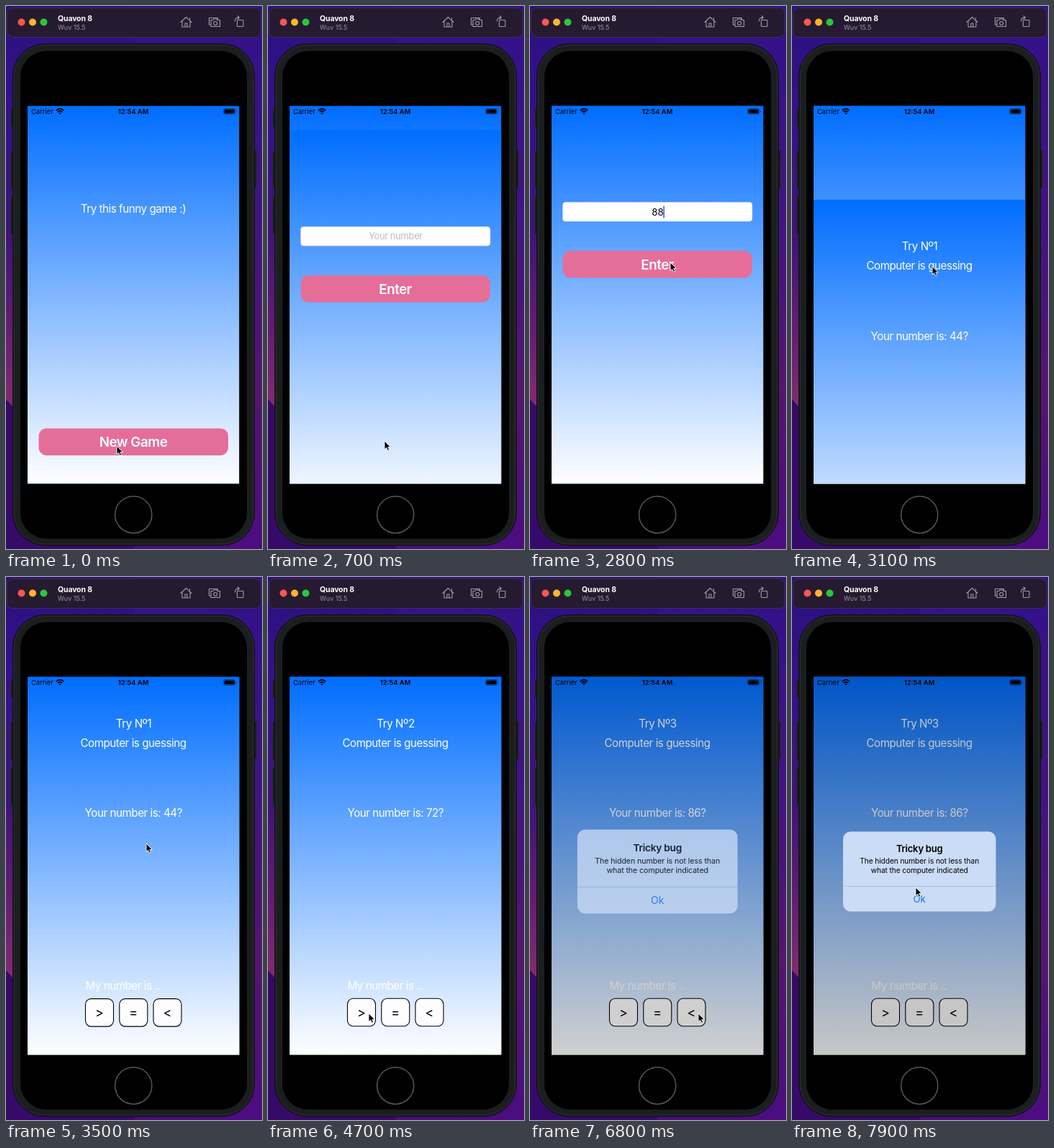
An HTML page that plays this animation: 356x754 px, repeating every 8000 ms.

```html
<!DOCTYPE html>
<html lang="en">
<head>
<meta charset="utf-8">
<title>Guessing game</title>
<style>
  html, body { margin: 0; width: 100%; height: 100%; overflow: hidden; background: #2c0f70; }
  svg { display: block; width: 100vw; height: 100vh; }
  text { font-family: Inter, Roboto, sans-serif; fill: #fff; }
  .mid { text-anchor: middle; }
  .body { font-size: 15.2px; letter-spacing: -.031em; }
  .big { font-size: 18.8px; font-weight: 600; letter-spacing: -.025em; }
  .input { font-size: 13px; letter-spacing: -.03em; }
  .sign { font-size: 18px; fill: #000; }
  .status text { font-size: 9.4px; fill: #000; }
  .small { font-size: 10.2px; letter-spacing: -.01em; }
  .dark { fill: #000; }
  .pink { fill: #e56e99; }
  .key { fill: #fdfdff; stroke: #000; stroke-width: 1.1; }
  .icon { fill: none; stroke: #a39aaa; stroke-width: 1.1; stroke-linejoin: round; stroke-linecap: round; }
</style>
</head>
<body>
<svg viewBox="0 0 356 754">
  <defs>
    <linearGradient id="sky" x1="0" y1="0" x2="0" y2="1">
      <stop offset="0" stop-color="#006dff"/><stop offset="1" stop-color="#fff"/>
    </linearGradient>
    <linearGradient id="wall" x1="0" y1="0" x2="0" y2="1">
      <stop offset="0" stop-color="#2b1080"/><stop offset=".2" stop-color="#34128a"/>
      <stop offset=".42" stop-color="#3f1478"/><stop offset=".6" stop-color="#651d74"/>
      <stop offset=".73" stop-color="#822a70"/><stop offset="1" stop-color="#4a0d78"/>
    </linearGradient>
    <linearGradient id="wallRight" x1="0" y1="0" x2="0" y2="1">
      <stop offset="0" stop-color="#31118a"/><stop offset=".45" stop-color="#44147f"/>
      <stop offset=".7" stop-color="#54166f"/><stop offset="1" stop-color="#4b0d80"/>
    </linearGradient>
    <clipPath id="glass"><rect x="30" y="138.5" width="294.5" height="525"/></clipPath>
  </defs>

  <!-- desktop -->
  <rect width="356" height="754" fill="url(#wall)"/>
  <rect x="178" width="178" height="754" fill="url(#wallRight)"/>
  <path d="M0 546L18 566V700H178V754H0Z" fill="#360a68"/>

  <!-- title bar -->
  <rect x="1.5" y="2.5" width="353" height="41" rx="8" fill="#261a30" stroke="#43364e" stroke-width=".8"/>
  <circle cx="21.5" cy="22.5" r="5" fill="#ff5650"/>
  <circle cx="37" cy="22.5" r="5" fill="#fcb52d"/>
  <circle cx="52.5" cy="22.5" r="5" fill="#2ac73d"/>
  <text x="72" y="21" font-size="10.5" font-weight="700" letter-spacing="-.15">Quavon 8</text>
  <text x="72" y="32.5" font-size="9" style="fill:#9c92a3">Wuv 15.5</text>
  <g class="icon">
    <path d="M243 22.5L250.500 15.500L258 22.500M245 21V29H256V21M255.500 19.500V16.500M249 29V24H252V29"/>
    <path d="M284.500 26H282.500V16.500H294.500V18.500"/>
    <path d="M285 19.500H288L289 18H293L294 19.500H297.500V28.500H285Z"/>
    <circle cx="291.200" cy="24" r="2.500"/>
    <rect x="321.500" y="19.500" width="8.500" height="9" rx="1"/>
    <path d="M318.500 21Q318.500 16 324 16M322 13.800L324.500 16L322 18.200"/>
  </g>

  <!-- phone -->
  <g fill="#191b1c" stroke="#303235" stroke-width=".6">
    <rect x="6.500" y="143" width="5" height="25" rx="1.500"/>
    <rect x="6.500" y="201" width="5" height="53" rx="1.500"/>
    <rect x="6.500" y="264" width="5" height="53" rx="1.500"/>
    <rect x="343.500" y="200" width="5" height="53" rx="1.500"/>
  </g>
  <rect x="9.500" y="52.500" width="336" height="696.500" rx="45" fill="#1b1e1e" stroke="#0d0f10"/>
  <rect x="11.500" y="54.500" width="332" height="692.500" rx="43" fill="none" stroke="#2a2d2d"/>
  <rect x="20" y="62.500" width="315" height="677" rx="36" fill="#000"/>
  <circle cx="177.200" cy="706.300" r="25.600" fill="#000" stroke="#565656" stroke-width="1.500"/>

  <g clip-path="url(#glass)">
    <g>
      <rect x="30" y="138.500" width="294.500" height="525" fill="url(#sky)"/>
      <text class="mid body" x="177" y="287.300">Try this funny game :)</text>
      <rect class="pink" x="45.500" y="586.500" width="263.500" height="37.500" rx="11"/>
      <text class="mid big" x="177" y="612">New Game</text>
    </g>

    <g id="entry">
      <rect x="30" y="138.500" width="294.500" height="525" fill="url(#sky)"/>
      <rect x="45.500" y="272.500" width="263.500" height="26.500" rx="4" fill="#fff" stroke="#d5d9e0" stroke-width=".6"/>
      <text class="mid input" id="hint" x="177.500" y="290.300" style="fill:#bdbdc1">Your number</text>
      <text class="mid" id="typed" x="177.500" y="290.500" font-size="13.400" style="fill:#000"></text>
      <rect id="caret" y="277.500" width="1.600" height="17" fill="#3d5cf0"/>
      <rect class="pink" x="45.500" y="340" width="263.500" height="37.500" rx="11"/>
      <text class="mid big" x="177" y="366">Enter</text>
    </g>

    <g id="guess">
      <rect x="30" y="138.500" width="294.500" height="525" fill="url(#sky)"/>
      <text class="mid body" id="round" x="177.500" y="208.500"></text>
      <text class="mid body" x="177" y="235.500">Computer is guessing</text>
      <text class="mid body" id="ask" x="177.300" y="333"></text>
      <text class="body" x="110.500" y="573">My number is ..</text>
      <rect class="key" x="110.500" y="585.300" width="39" height="38.500" rx="8"/>
      <rect class="key" x="157.800" y="585.300" width="39" height="38.500" rx="8"/>
      <rect class="key" x="205" y="585.300" width="39" height="38.500" rx="8"/>
      <text class="mid sign" x="130" y="610.500">&gt;</text>
      <text class="mid sign" x="177.300" y="610.500">=</text>
      <text class="mid sign" x="224.500" y="610.500">&lt;</text>
    </g>

    <rect id="dim" x="30" y="138.500" width="294.500" height="525" fill="#000"/>

    <g id="alert">
      <rect x="71" y="353.500" width="212.500" height="111" rx="10.500" fill="#cbdcf6"/>
      <path d="M71 429.500H283.500" stroke="#a6b7d2" stroke-width=".8"/>
      <text class="mid dark" x="177.200" y="382" font-size="13.100" font-weight="600" letter-spacing="-.26" style="fill:#000">Tricky bug</text>
      <text class="mid small" x="177.200" y="398.300" style="fill:#000">The hidden number is not less than</text>
      <text class="mid small" x="177.200" y="410.800" style="fill:#000">what the computer indicated</text>
      <text class="mid" x="177.200" y="452" font-size="13.300" style="fill:#0a78ff">Ok</text>
    </g>

    <g class="status">
      <text x="35" y="150">Carrier</text>
      <text class="mid" x="177" y="150" font-weight="600">12:54 AM</text>
      <path d="M69.800 145.100Q75 140.300 80.200 145.100M71.800 147.200Q75 144.300 78.200 147.200" fill="none" stroke="#000" stroke-width="1.700"/>
      <path d="M73.300 148.700Q75 147.200 76.700 148.700L75 150.500Z"/>
      <rect x="302.500" y="142.500" width="16.500" height="7.800" rx="2.200" fill="none" stroke="#000" stroke-opacity=".5" stroke-width=".8"/>
      <rect x="303.600" y="143.600" width="14.300" height="5.600" rx="1.300"/>
      <path d="M320 145Q321.700 146.400 320 147.800Z" fill-opacity=".6"/>
    </g>
  </g>

  <path id="pointer" d="M0 0V11.600L2.600 9.200L4.500 13.300L6.600 12.300L4.800 8.400H8.400Z" fill="#000" stroke="#fff" stroke-width=".9" stroke-linejoin="round"/>
</svg>

<script>
const LOOP = 8000, STEP = 100, HEIGHT = 525;
const $ = id => document.getElementById(id);
const set = (id, attrs) => { for (const k in attrs) $(id).setAttribute(k, attrs[k]); };
const clamp = v => Math.min(1, Math.max(0, v));

// remaining distance of a critically damped spring, 1 to 0
const spring = (t, start) => {
  const u = Math.max(0, t - start) * 0.018;
  return (1 + u) * Math.exp(-u);
};

// pointer path: time, x, y
const path = [
  [0, 154, 611], [350, 154, 611], [700, 162, 604], [1000, 162, 604],
  [1700, 188, 290], [2400, 188, 290], [2800, 195, 356], [2950, 195, 356],
  [3300, 195, 370], [3800, 195, 370], [4200, 138, 600], [4500, 140, 606],
  [5900, 140, 606], [6500, 234, 606], [7500, 234, 606], [7900, 172, 431], [8000, 172, 431]
];

function pointerAt(t) {
  const i = path.findIndex(p => p[0] > t);
  const a = path[i - 1], b = path[i];
  const k = (t - a[0]) / (b[0] - a[0]);
  const e = k * k * (3 - 2 * k);
  return [a[1] + (b[1] - a[1]) * e, a[2] + (b[2] - a[2]) * e];
}

const slide = (id, t, start) =>
  set(id, { transform: `translate(0 ${HEIGHT * spring(t, start)})` });

function draw(t) {
  slide('entry', t, 454);
  slide('guess', t, 2950);

  const typed = t < 2300 ? '' : t < 2500 ? '8' : '88';
  $('typed').textContent = typed;
  set('hint', { opacity: typed ? 0 : 1 });
  set('caret', { x: typed ? 177 + 4.200 * typed.length : 137.200, opacity: t < 1800 ? 0 : 1 });

  const round = t < 4700 ? 1 : t < 5800 ? 2 : 3;
  $('round').textContent = `Try Nº${round}`;
  $('ask').textContent = `Your number is: ${[44, 72, 86][round - 1]}?`;

  const shown = 6648;
  const size = 1 + 0.2 * spring(t, shown);
  set('dim', { opacity: 0.22 * clamp((t - shown) / 180) });
  set('alert', {
    opacity: clamp((t - shown) / 200),
    transform: `translate(177.200 409) scale(${size}) translate(-177.200 -409)`
  });

  set('pointer', { transform: `translate(${pointerAt(t)})` });
}

const origin = performance.now();
function tick() {
  const t = (performance.now() - origin) % LOOP;
  draw(Math.floor(t / STEP) * STEP);
  requestAnimationFrame(tick);
}
tick();
</script>
</body>
</html>
```
